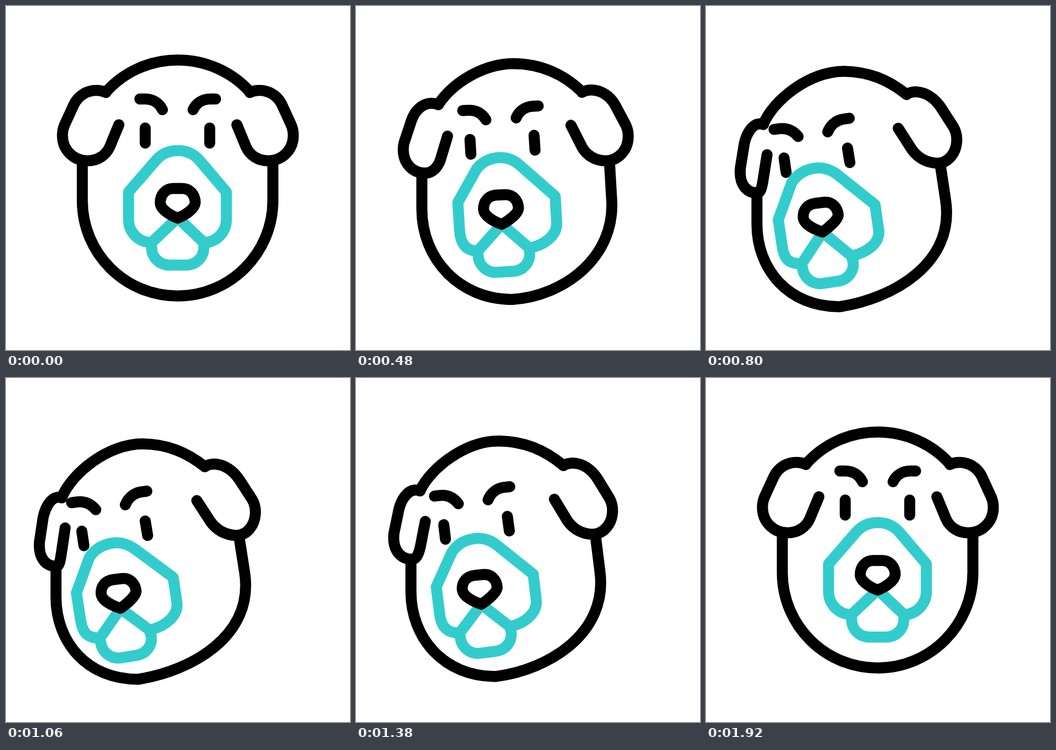
Animation, 640 px wide and 640 px high, one loop 2400 ms. Source, as an HTML page:

```html
<!DOCTYPE html>
<html lang="en">
<head>
<meta charset="utf-8">
<title>Dog turning its head</title>
<style>
  html, body { margin: 0; width: 100%; height: 100%; overflow: hidden; background: #fff; }
  svg { display: block; width: 100%; height: 100%; }
  path { fill: none; stroke-width: 20.5; stroke-linecap: round; stroke-linejoin: round; }
</style>
</head>
<body>
<svg id="stage" viewBox="0 0 640 640"></svg>
<script>
const LOOP = 2400, STEP = 20;
const BLACK = '#000', TEAL = '#33cccc';

// Each part: colour, front pose, turned pose, and how its points follow the sniff
const parts = [
  // crown
  [BLACK,
    'M186 160C220 122 268 100.5 319.5 100.5C371 100.5 420 122 454 160',
    'M104 222C122 177 190 122.5 254 122.5C300 123 336 138 370 165'],
  // cheeks and chin
  [BLACK,
    'M142 290L142 362C142 460 221 539.5 319.5 539.5C417 539.5 496.5 460 496.5 362L496.5 290',
    'M93 352L93 408C93 490 150 561 246 560.5C345 545 462 480 444 362L434 298'],
  // ears
  [BLACK,
    'M186 161C180 158 174 157 168 157C150 157 134 167 126 184L109 221C106 228 105 234 105 241C105 267 125 288 152 288C170 288 186 278 193 262L210 221',
    'M104 223C101 222 98 221.5 95 222C83 224 73 240 69 260L63 300C62 304 62 308 62 312C62 335 74 351 94 350C99 350 101 340 103 326L110 279'],
  [BLACK,
    'M453.5 161C459.5 158 465.5 157 471.5 157C489.5 157 505.5 167 513.5 184L530.5 221C533.5 228 534.5 234 534.5 241C534.5 267 514.5 288 487.5 288C469.5 288 453.5 278 446.5 262L429.5 221',
    'M370 165C376 161 382 160 388 160C407 161 423 173 434 189L458 226C462 233 464 241 464 249C464 274 448 293 428 293C410 292 393 284 381 268L355 228'],
  // eyes
  [BLACK, 'M259 227L259 255', 'M141 285L145 312'],
  [BLACK, 'M379 227L379 255', 'M259 266L263.5 293'],
  // brows
  [BLACK, 'M249 173L259 173C273 173 285 180 291 193', 'M122 232L133 230.5C147 229 158 234 167 245'],
  [BLACK, 'M390 173L380 173C366 173 354 180 348 193', 'M262 210.5L251 212C238 214 227 223 222 236'],
  // muzzle
  [TEAL,
    'M270 440C247 440 228 421 228 397L228 346L280 286C290 275 304 269 319.5 269C335 269 349 275 359 286L410 346L410 397C410 421 391 440 369 440',
    'M174 484C152 484 143 475 139 452L131 400L155 334C166 317 183 308 204 306.5C217 306 229 311 238 317L311 371L318 418C321 441 298 462 267 469',
    'cc---ttttttt---cc'],
  // mouth
  [TEAL, 'M270 441L319.5 394L369 441', 'M174 485L213 429L267 469', 'cnc'],
  [TEAL,
    'M270 441L271 450C271 468 286 482 304 482L335 482C353 482 368 468 368 450L369 441',
    'M174 485L176 491C178 508 192 522 211 521L243 516C261 513 273 497 270 480L267 469',
    'c'],
  // nose
  [BLACK,
    'M311 339.5L328 339.5C342 339.5 352 351 352 366C351 378 332 390 319.5 394.5C306 390 287 378 287 366C287 351 297 339.5 311 339.5Z',
    'M200 375L217 373C231 372 241 383 242 397C241 406 225 420 213 428.5C199 424 179 415 177 402C176 388 184 377 200 375Z',
    'n']
];

// Sniff offset over time: ms, x, y
const sniffKeys = [
  [0, 0, 0], [240, 0, 0], [480, -6, 0], [800, 0, -6.5], [1060, 0, 0],
  [1380, 0, 0], [1600, -4, -10], [1920, 0, 0], [LOOP, 0, 0]
];
const weights = { '-': [0, 0], c: [1, 0.4], t: [1, 0.55], n: [1, 1] };

const clamp = x => Math.min(1, Math.max(0, x));
const mix = (a, b, k) => a + (b - a) * k;
const smooth = x => x * x * (3 - 2 * x);

// cubic-bezier(.75, 0, .25, 1)
function ease(x) {
  let lo = 0, hi = 1;
  for (let i = 0; i < 24; i++) {
    const s = (lo + hi) / 2, r = 1 - s;
    if (2.25 * r * r * s + 0.75 * r * s * s + s * s * s < x) lo = s; else hi = s;
  }
  return smooth((lo + hi) / 2);
}

function turnAt(t) {
  return t < 1030 ? ease(clamp(t / 1014)) : 1 - ease(clamp((t - 1050) / 848));
}

function sniffAt(t) {
  const i = sniffKeys.findIndex(k => k[0] > t);
  const a = sniffKeys[i - 1], b = sniffKeys[i];
  const k = smooth((t - a[0]) / (b[0] - a[0]));
  return [mix(a[1], b[1], k), mix(a[2], b[2], k)];
}

const numbers = d => d.match(/[\d.]+/g).map(Number);
const stage = document.getElementById('stage');

const shapes = parts.map(([color, front, turned, follow = '-']) => {
  const el = document.createElementNS('http://www.w3.org/2000/svg', 'path');
  el.setAttribute('stroke', color);
  stage.append(el);
  return { el, front, a: numbers(front), b: numbers(turned), follow };
});

function draw(t) {
  const turn = turnAt(t), sniff = sniffAt(t);
  const arc = -8 * turn * (1 - turn);
  for (const { el, front, a, b, follow } of shapes) {
    let i = 0;
    el.setAttribute('d', front.replace(/[\d.]+/g, () => {
      const axis = i % 2;
      const w = weights[follow[i >> 1] || follow[0]][axis];
      const v = mix(a[i], b[i], turn) + sniff[axis] * w + axis * arc;
      i++;
      return v.toFixed(2);
    }));
  }
}

const start = performance.now();
function tick() {
  const t = (performance.now() - start) % LOOP;
  draw(Math.floor(t / STEP) * STEP);
  requestAnimationFrame(tick);
}
tick();
</script>
</body>
</html>
```
